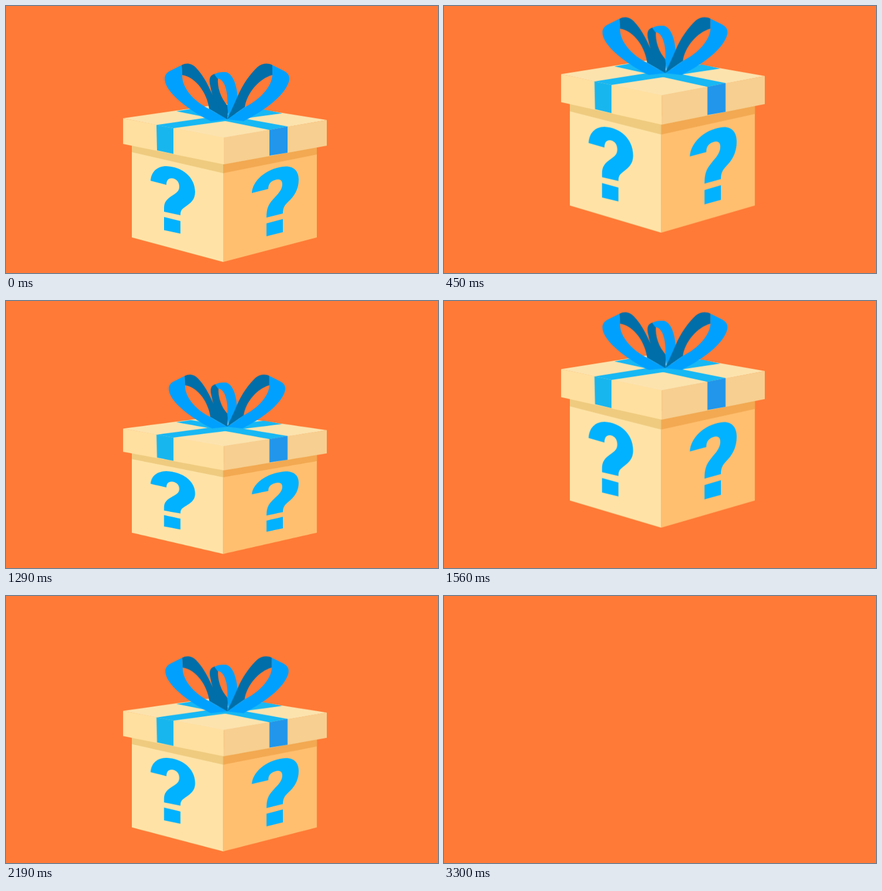
These frames come from a looping animation (738 px wide and 457 px high, 3.39 s). An HTML page:

```html
<!DOCTYPE html>
<html lang="en">
<head>
<meta charset="utf-8">
<title>Gift box reveal</title>
<style>
  html, body { margin: 0; width: 100%; height: 100%; overflow: hidden; background: #ff7a36; }
  svg { display: block; width: 738px; height: 457px; }
  g { transform-box: view-box; }

  /* Each part has its own squash and peak pose; the timing is shared. */
  .part { animation: hop 3390ms infinite; }
  .body {
    transform-origin: 371px 438px;
    --squash: translateY(-5px) scale(1, .863);
    --peak: translateY(-50px) scale(1, 1.105);
  }
  .lid {
    transform-origin: 371px 271px;
    --squash: translateY(19px) scale(1, .905);
    --peak: translateY(-68px) scale(1, 1.095);
  }
  .bow {
    transform-origin: 378px 194px;
    --squash: translateY(21.5px) scale(.935, .935);
    --peak: translateY(-79px) scale(1.003, 1.003);
  }
  .box { transform-origin: 371px 300px; animation: vanish 3390ms infinite; }
  .burst { transform-origin: 370px 256px; animation: burst 3390ms infinite; }
  .fade { animation: fade 3390ms step-end infinite; }

  @keyframes hop {
    0%, 32.743%, 63.717% {
      transform: translateY(0) scale(1, 1);
      animation-timing-function: cubic-bezier(.3, .2, .6, 1);
    }
    5.31%, 38.053% {
      transform: var(--squash);
      animation-timing-function: cubic-bezier(.35, .2, .6, 1);
    }
    13.274%, 46.018% {
      transform: var(--peak);
      animation-timing-function: cubic-bezier(.333, 0, .667, .333);
    }
    22.124%, 54.867% { transform: translateY(0) scale(1, 1); }
    69.027%, 100% { transform: var(--squash); }
  }
  @keyframes vanish {
    0%, 69.027% { transform: scale(1); animation-timing-function: ease-in; }
    71.681%, 100% { transform: scale(0); }
  }
  @keyframes burst {
    0%, 69.912% { transform: scale(0); animation-timing-function: cubic-bezier(.2, .6, .4, 1); }
    76.106%, 100% { transform: scale(1); }
  }
  @keyframes fade {
    0% { opacity: 1; }
    95.575% { opacity: .67; }
    96.46% { opacity: .33; }
    97.345%, 100% { opacity: 0; }
  }

  .bright { fill: #00a0ff; }
  .dark { fill: #006ea8; }
  .mark { fill: #00b2ff; }
  .band { fill: #17b8f4; }
  .blue { fill: #00a0ff; stroke: #00a0ff; }
  .green { fill: #29ff9f; stroke: #29ff9f; }
  .gold { fill: #ffd166; stroke: #ffd166; }
  #side * { stroke-width: 0; }
  #side path { stroke-width: 12px; stroke-linecap: round; }
  text { font: 800 111px "Open Sans", "Noto Sans", sans-serif; letter-spacing: -3.5px; fill: #fff1d2; }
</style>
</head>
<body>
<svg viewBox="0 0 738 457">
  <g class="box">
    <g class="part body">
      <path fill="#ffe3a6" d="M215 226 371 258V438L215 396Z"/>
      <path fill="#ffbf6f" d="M371 258 531 226V396L371 438Z"/>
      <path fill="#eecb7f" d="M215 226 371 258V286L215 250Z"/>
      <path fill="#f2a951" d="M371 258 531 226V254L371 286Z"/>
      <g class="mark">
        <path d="M247 299C248 284 258 274 274 274C301 275 323 293 323 318C323 332 315 337 307 343C300 348 298 350 298 358L270 352V346C270 336 274 331 283 325C291 320 296 317 296 309C296 301 291 296 285 295C277 294 274 299 274 306Z"/>
        <path d="M270 361 298 368V389.5L270 383.5Z"/>
        <path d="M420 320C421 299 444 279 472 275C490 272 500 281 500 297C500 314 492 326 482 335C476 341 473 345 473 355L445 362C445 347 448 340 456 331C464 322 472 315 472 305C472 298 468 296 462 297C453 299 448 304 448 313Z"/>
        <path d="M445 372 473 364.5V387L445 394Z"/>
      </g>
    </g>

    <g class="part lid">
      <path fill="#fce3ae" d="M200 192 373 167 548 195 371 226Z"/>
      <path fill="#ffe0a0" d="M200 192 372 225V271L200 236Z"/>
      <path fill="#f7cf90" d="M372 225 548 195V239L372 271Z"/>
      <path class="band" d="M257 203.5 440 177 472 183.5 286 209Z"/>
      <path class="band" d="M291 180 316 176 481 206 450 212Z"/>
      <path fill="#18b6ee" d="M257 203.5 286 209V253L258 247Z"/>
      <path fill="#2196ea" d="M450 212 481 206V251L450 256Z"/>
    </g>

    <g class="part bow">
      <path class="dark" d="M300 101C309 96 318 99 324 105C340 122 346 138 353 152L378 178V194L347 176C344 150 325 122 301 118Z"/>
      <path class="dark" d="M357 116C348 118 346 125 349 137C352 152 356 168 378 194L380 172C366 158 361 138 362 124L366 121Z"/>
      <path class="bright" d="M356 117C361 113 368 113 375 113C388 115 396 138 396 165L380 190 378 171C380 150 374 124 361 124Z"/>
      <path class="dark" d="M378 194C384 180 390 168 395 156C404 134 418 115 430 104C438 98 447 97 455 101V118C432 124 411 150 408 173Z"/>
      <path class="bright" d="M455 101 475 111C486 117 486 126 480 137C466 164 424 188 406 197L378 194 408 173C434 160 454 138 455 118Z"/>
      <path class="bright" d="M300 101 280 111C269 117 269 126 275 138C288 162 330 188 350 197L378 194 347 176C322 164 300 140 301 118Z"/>
    </g>
  </g>

  <g class="fade">
    <g class="burst">
      <g id="side">
        <circle class="gold" cx="78.2" cy="115.2" r="11"/>
        <circle class="blue" cx="43" cy="286.5" r="11"/>
        <circle class="blue" cx="120" cy="405" r="11"/>
        <path class="green" d="M147 92 163.5 77.5"/>
        <path class="gold" d="M167 149.5 179 167.5"/>
        <path class="green" d="M51.5 355 63.5 373"/>
        <rect class="blue" x="-14.5" y="-7.25" width="29" height="14.5" transform="translate(224.4 80.2) rotate(-41)"/>
        <rect class="green" x="-14.5" y="-7.25" width="29" height="14.5" transform="translate(82 205) rotate(-41)"/>
        <rect class="gold" x="-13.5" y="-7.5" width="27" height="15" transform="translate(119.7 285) rotate(31)"/>
        <rect class="green" x="-6.5" y="-13.5" width="13" height="27" transform="translate(173.5 355.7) rotate(-8)"/>
      </g>
      <use href="#side" transform="matrix(-1 0 0 1 740.3 0)"/>
      <text x="238" y="293.7" dx="0 -2 4.5">New</text>
    </g>
  </g>
</svg>
</body>
</html>
```
